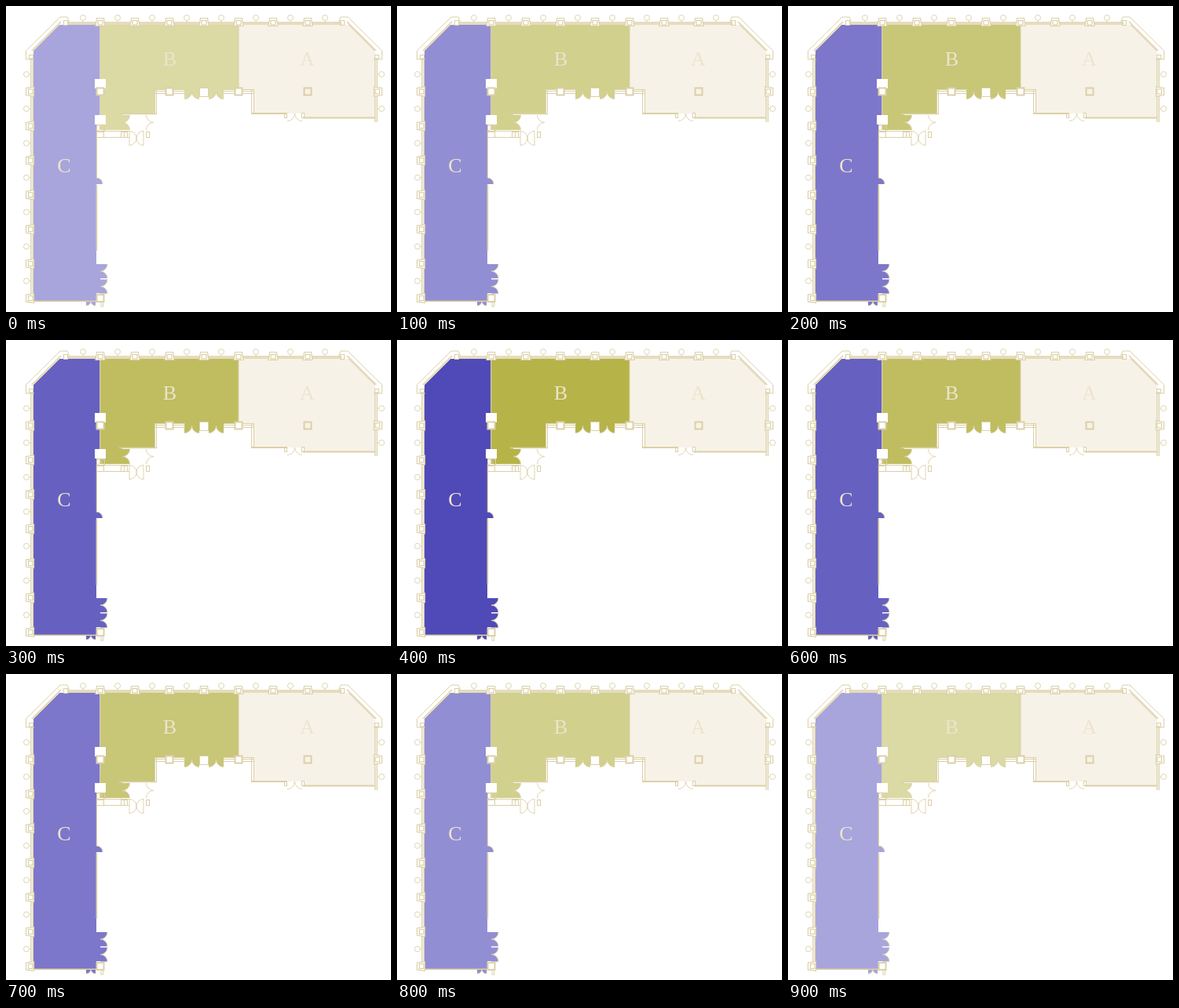
Write an HTML page with a canvas that moves like this. It is 490x390 px and loops after 1000 ms.

```html
<!DOCTYPE html>
<html lang="en">
<head>
<meta charset="utf-8">
<title>Floor plan</title>
<style>
html, body { margin: 0; width: 490px; height: 390px; overflow: hidden; background: #fff; }
canvas { display: block; }
</style>
</head>
<body>
<canvas id="plan" width="490" height="390"></canvas>
<script>
const ctx = document.getElementById('plan').getContext('2d');
const LINE = '#dcd0a7', CREAM = '#f7f2e8', LETTER = '#ede4cb';
const PURPLE = [80, 74, 184], OLIVE = [182, 179, 73];
const LEFT = 35, TOP = 24, AXIS = 252;
const BAY = 44, SIDE_BAY = 43.9, PILLAR_Y = 109;

const tint = (rgb, a) => `rgb(${rgb.map(c => Math.round(255 + (c - 255) * a))})`;
const bayX = i => 120 + BAY * i;
const sideY = i => PILLAR_Y + SIDE_BAY * i;

function fill(color, left, top, right, bottom) {
  ctx.fillStyle = color;
  ctx.fillRect(left, top, right - left, bottom - top);
}

function line(x1, y1, x2, y2, width = 1) {
  ctx.beginPath();
  ctx.moveTo(x1, y1);
  ctx.lineTo(x2, y2);
  ctx.lineWidth = width;
  ctx.stroke();
}

const wallX = (y, x1, x2, width) => line(x1, y, x2, y, width);
const wallY = (x, y1, y2, width) => line(x, y1, x, y2, width);

function frame(x, y, w, h, width = 1) {
  ctx.lineWidth = width;
  ctx.strokeRect(x, y, w, h);
}

function placed(x, y, turn, flip, paint) {
  ctx.save();
  ctx.translate(x, y);
  ctx.rotate(turn);
  ctx.scale(flip, 1);
  paint();
  ctx.restore();
}

// Quarter-disc door swing; sx and sy give the direction it opens from its hinge.
function door(x, y, r, sx, sy, color) {
  const start = Math.atan2(0, sx), end = sy * Math.PI / 2;
  ctx.beginPath();
  ctx.arc(x, y, r, start, end, sx * sy < 0);
  ctx.lineWidth = 0.9;
  if (color) {
    ctx.lineTo(x, y);
    ctx.fillStyle = color;
    ctx.fill();
    ctx.beginPath();
    ctx.arc(x, y, r, start, end, sx * sy < 0);
  }
  ctx.stroke();
}

// Two leaves that meet halfway along an opening.
function pairAcross(x, y, span, r, color) {
  door(x, y, r, 1, 1, color);
  door(x + span, y, r, -1, 1, color);
}

function pairDown(x, y, span, r, side, color) {
  door(x, y, r, side, 1, color);
  door(x, y + span, r, side, -1, color);
}

function pillar(x, y, color = '#fff') {
  fill(color, x - 5, y - 5, x + 5, y + 5);
  frame(x - 4.5, y - 4.5, 9, 9, 2);
}

function column(x, y, turn) {
  placed(x, y, turn, 1, () => {
    ctx.beginPath();
    ctx.moveTo(-4.5, -5);
    ctx.lineTo(4.5, -5);
    ctx.lineTo(6, 5);
    ctx.lineTo(-6, 5);
    ctx.closePath();
    ctx.fillStyle = '#fff';
    ctx.fill();
    ctx.lineWidth = 1.2;
    ctx.stroke();
    frame(-3, -2, 6, 5.5, 1.2);
  });
}

function lamp(x, y, dx, dy) {
  ctx.beginPath();
  ctx.arc(x, y, 3.5, 0, 2 * Math.PI);
  ctx.lineWidth = 0.9;
  ctx.stroke();
  line(x + dx * 3.5, y + dy * 3.5, x + dx * 6, y + dy * 6, 0.8);
}

function rooms(purple, olive) {
  fill(purple, LEFT, TOP, 119.5, 140);
  fill(purple, LEFT, 140, 115, 376);
  fill(olive, 120, TOP, 296, 106);
  fill(olive, 120, 106, 189, 138);
  fill(olive, 120, 138, 148, 158);
  fill(olive, 227, 106, 277, 109);
  fill(CREAM, 296, TOP, 470, 106);
  fill(CREAM, 316, 106, 470, 137);
  fill(CREAM, 380, 137, 470, 142);
}

function doors(purple, olive) {
  pairDown(148, 139, 19, 9.5, 1, olive);
  pairDown(188, 139, 19, 9.5, -1);
  pairAcross(227, PILLAR_Y, 19, 9.5, olive);
  pairAcross(258, PILLAR_Y, 19, 9.5, olive);
  pairAcross(358, 137, 19, 9.5);
  pairAcross(102, 376, 12, 6, purple);

  fill(purple, 114, 329, 120, 366);
  pairDown(120, 329, 18, 9, 1, purple);
  pairDown(120, 348.5, 18, 9, 1, purple);
  door(115, 227, 8, 1, -1, purple);

  for (const side of [-1, 1]) {
    const hinge = 166 + 9 * side;
    wallY(hinge, 159, 178, 0.9);
    for (const up of [-1, 1]) door(hinge, 168.5, 9, -side, up);
  }
}

// Chamfered corner at the left; the right one is its mirror image.
function corner() {
  ctx.beginPath();
  ctx.moveTo(25, 20);
  ctx.lineTo(72, 20);
  ctx.lineTo(LEFT, 57);
  ctx.lineTo(25, 68);
  ctx.fillStyle = '#fff';
  ctx.fill();
  line(25.5, 57, 69, 14);
  line(33, 57, 70, 20, 1.5);
  line(LEFT, 57, 68, TOP);
  wallX(14, 69, 78);
  wallY(25.5, 57, 68);
  wallX(68, 25, 36);
  line(78, 14, 80.5, 20);
  frame(29.5, 62.5, 5, 5);
  frame(73.5, 18.5, 5, 6);
}

function walls() {
  wallX(21, 78, 427, 1.4);
  wallX(23, 78, 427, 1.4);
  for (const [x, end] of [[33, 376], [2 * AXIS - 33, 148]]) {
    wallY(x - 1.2, 66, end, 1.3);
    wallY(x + 1.2, 66, end, 1.3);
  }

  wallY(119.8, TOP, 158);
  wallY(296, TOP, 105);
  for (const y of [106.5, 108.5, 111.5]) {
    wallX(y, 189, 228);
    wallX(y, 277, 316);
  }
  for (const x of [189.5, 191.5, 312.5, 315.5]) wallY(x, 106, 138);
  wallX(137.5, 144, 192, 1.4);
  wallX(137, 312, 358, 1.8);
  wallX(142.5, 378, 470, 1.8);
  frame(354.5, 136.5, 3, 6);
  frame(376.5, 136.5, 3, 6);

  wallY(115.4, 159, 219, 1.2);
  wallY(115.4, 228, 312, 1.7);
  wallX(376.3, 28, 124, 1.4);
  frame(121, 377, 2.5, 6);

  wallX(159.5, 115, 157);
  wallX(167.5, 115, 157);
  for (const x of [115.5, 146.5, 150.5, 178.5]) frame(x, 160.5, x < 120 ? 9 : 4, 7);
}

function fittings() {
  fill('#fff', 113, 93, 127, 105);
  fill('#fff', 113, 139, 127, 151);
  frame(115.5, 151.5, 10, 8);
  line(115.5, 151.5, 125.5, 159.5, 0.8);
  line(125.5, 151.5, 115.5, 159.5, 0.8);

  for (const i of [0, 2, 4]) pillar(bayX(i), PILLAR_Y);
  pillar(bayX(6), PILLAR_Y, CREAM);
  pillar(bayX(0), sideY(6));
  fill('#fff', 246.5, 104, 257.5, 115);
  frame(246.5, 104.5, 11, 11);

  for (let i = 0; i < 8; i++) lamp(bayX(i) - BAY / 2, 15, 0, 1);
  for (let i = 0; i < 7; i++) {
    column(bayX(i), 20.5, 0);
    column(30.5, sideY(i), -Math.PI / 2);
    lamp(26, sideY(i) - SIDE_BAY / 2, 1, 0);
  }
  for (const i of [0, 1]) lamp(2 * AXIS - 26, sideY(i) - SIDE_BAY / 2, -1, 0);
  column(2 * AXIS - 30.5, PILLAR_Y, Math.PI / 2);
}

function label(text, x, y) {
  ctx.font = '26px "Liberation Serif", "Times New Roman", serif';
  ctx.textAlign = 'center';
  ctx.fillStyle = LETTER;
  ctx.fillText(text, x, y);
}

function draw() {
  const step = Math.floor(performance.now() / 100) % 10;
  const alpha = 0.5 + Math.min(step, 9 - step) / 8;
  const purple = tint(PURPLE, alpha), olive = tint(OLIVE, alpha);
  fill('#fff', 0, 0, 490, 390);
  ctx.strokeStyle = LINE;
  rooms(purple, olive);
  doors(purple, olive);
  placed(0, 0, 0, 1, corner);
  placed(2 * AXIS, 0, 0, -1, corner);
  walls();
  fittings();
  label('A', 383.5, 76);
  label('B', 208.5, 76);
  label('C', 74, 212);
  requestAnimationFrame(draw);
}
draw();
</script>
</body>
</html>
```
